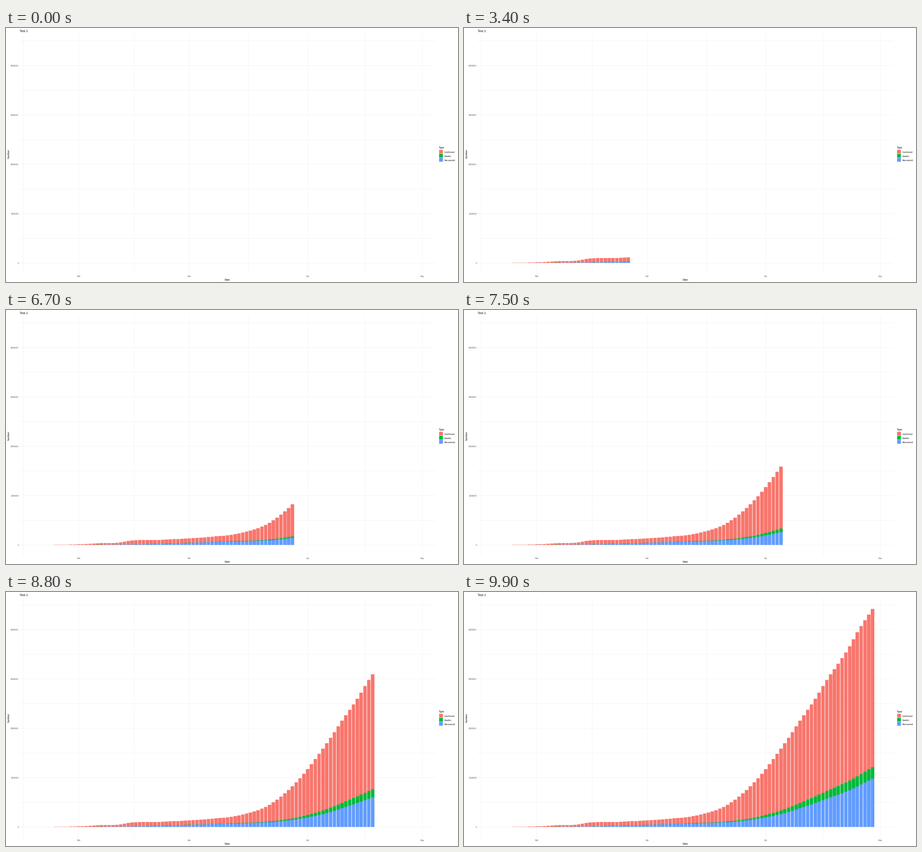
A matplotlib script that plays this animation: 998 px wide and 561 px high, repeating every 10 s.

```python
import numpy as np
import matplotlib.pyplot as plt
from matplotlib.animation import FuncAnimation
from matplotlib.patches import Rectangle

W, H, DPI = 998, 561, 100
FRAMES, STEP_MS = 100, 100
FINE_X, FINE_Y = 1920 / W, 1080 / H     # edges sit on a finer pixel grid
ZERO_Y, PER_K = 518.9, 0.10908
FEB_X, DAY_W = 160.3, 8.4304
FIRST_DAY = -6                          # 26 January, counted from 1 February
DAYS = 95
RED, GREEN, BLUE = "#F8766D", "#00BA38", "#619CFF"

plt.rcParams.update({"font.family": "Liberation Sans", "text.hinting": "none"})


def snap(v, fine):
    return np.floor(v * fine + 0.5) / fine


def y_at(thousands):
    return ZERO_Y - thousands * PER_K


def day_x(day):
    return FEB_X + day * DAY_W


def smooth(*points):
    """Cubic curve through (day, thousands) points, one value per day."""
    x, y = np.array(points, float).T
    slope = np.gradient(y, x)
    d = np.arange(DAYS)
    i = np.clip(np.searchsorted(x, d, "right") - 1, 0, len(x) - 2)
    h = x[i + 1] - x[i]
    t = (d - x[i]) / h
    ease = t * t * (3 - 2 * t)
    return (y[i] + ease * (y[i + 1] - y[i])
            + h * t * (1 - t) * ((1 - t) * slope[i] - t * slope[i + 1]))


total = smooth((0, 2.2), (6, 12.6), (12, 37), (17, 52), (18, 68), (28, 105),
               (40, 161), (48, 234), (56, 449), (64, 986), (70, 1586),
               (76, 2263), (79, 2594), (82, 2978), (85, 3304), (88, 3658),
               (90, 3941), (94, 4415))
recovered = smooth((0, 0.05), (10, 1.1), (20, 9.4), (28, 23.4), (36, 45.6),
                   (44, 64.4), (52, 83.3), (58, 108), (64, 165), (70, 262),
                   (76, 405), (82, 571), (88, 745), (94, 982))
deaths = smooth((0, 0.05), (28, 2.5), (43, 4), (53, 10), (62, 31), (68, 59),
                (75, 105), (82, 157), (94, 229))

fig = plt.figure(figsize=(W / DPI, H / DPI), dpi=DPI, facecolor="white")
ax = fig.add_axes([0, 0, 1, 1])
ax.set(xlim=(0, W), ylim=(H, 0))
ax.axis("off")


def box(x0, y0, x1, y1, color, z=3):
    return ax.add_patch(Rectangle((x0, y0), x1 - x0, y1 - y0, fc=color,
                                  lw=0, snap=False, zorder=z))


def label(x, y, s, px, color="black", **kw):
    ax.text(x, y, s, fontsize=px * 72 / DPI, color=color,
            **{"va": "baseline", **kw})


def line(xs, ys):
    ax.plot(xs, ys, color="#EBEBEB", lw=72 / DPI / FINE_X, snap=False,
            solid_capstyle="butt", zorder=1)


def draw_grid():
    months = {"Feb": 0, "Mar": 29, "Apr": 60, "May": 90}
    for d in [-14.5, 14.5, 44.5, 75, *months.values()]:
        x = snap(day_x(d), FINE_X) + 0.5 / FINE_X
        line([x, x], [12, 543])
    for k in range(0, 5000, 500):
        y = snap(y_at(k), FINE_Y) + 0.5 / FINE_Y
        line([30, 948], [y, y])
        if k % 1000 == 0:
            label(28.3, y + 1.8, str(k * 1000), 4.6, "#4D4D4D", ha="right")
    for name, d in months.items():
        label(day_x(d), 549.9, name, 4.6, "#4D4D4D", ha="center")


def draw_titles():
    label(30, 9, "Test 1", 6.9)
    label(489, 557.5, "Date", 5.75, ha="center")
    label(5.7, 278, "Number", 5.75, ha="center", va="center", rotation=90)
    label(956, 266, "Type", 5.75)
    keys = [("Confirmed", RED), ("Deaths", GREEN), ("Recovered", BLUE)]
    for i, (name, color) in enumerate(keys):
        y = 269.1 + 8.98 * i
        box(956.3, y, 964.6, y + 8.3, color)
        label(968, y + 6.7, name, 5.05)


def draw_bar(i):
    mid = day_x(FIRST_DAY + i)
    x0, x1 = (snap(mid + side * 0.45 * DAY_W, FINE_X) for side in (-1, 1))
    levels = total[i], recovered[i] + deaths[i], recovered[i], 0
    edges = [snap(y_at(v), FINE_Y) for v in levels]
    parts = []
    for z, color in enumerate((RED, GREEN, BLUE)):
        top, low = edges[z], edges[z + 1]
        if top < low:
            # run under the next part so that no white seam shows
            low = min(np.ceil(low), edges[-1])
            parts.append(box(x0, top, x1, low, color, 3 + z))
    return parts


draw_grid()
draw_titles()
bars = [draw_bar(i) for i in range(DAYS)]


def update(n):
    # three leading days are too small to show
    shown = round(n * (DAYS + 3) / (FRAMES - 1)) - 3
    for i, parts in enumerate(bars):
        for p in parts:
            p.set_visible(i < shown)
    return []


anim = FuncAnimation(fig, update, frames=FRAMES, interval=STEP_MS,
                     init_func=lambda: update(0), repeat=True, repeat_delay=0)
plt.show()
```
